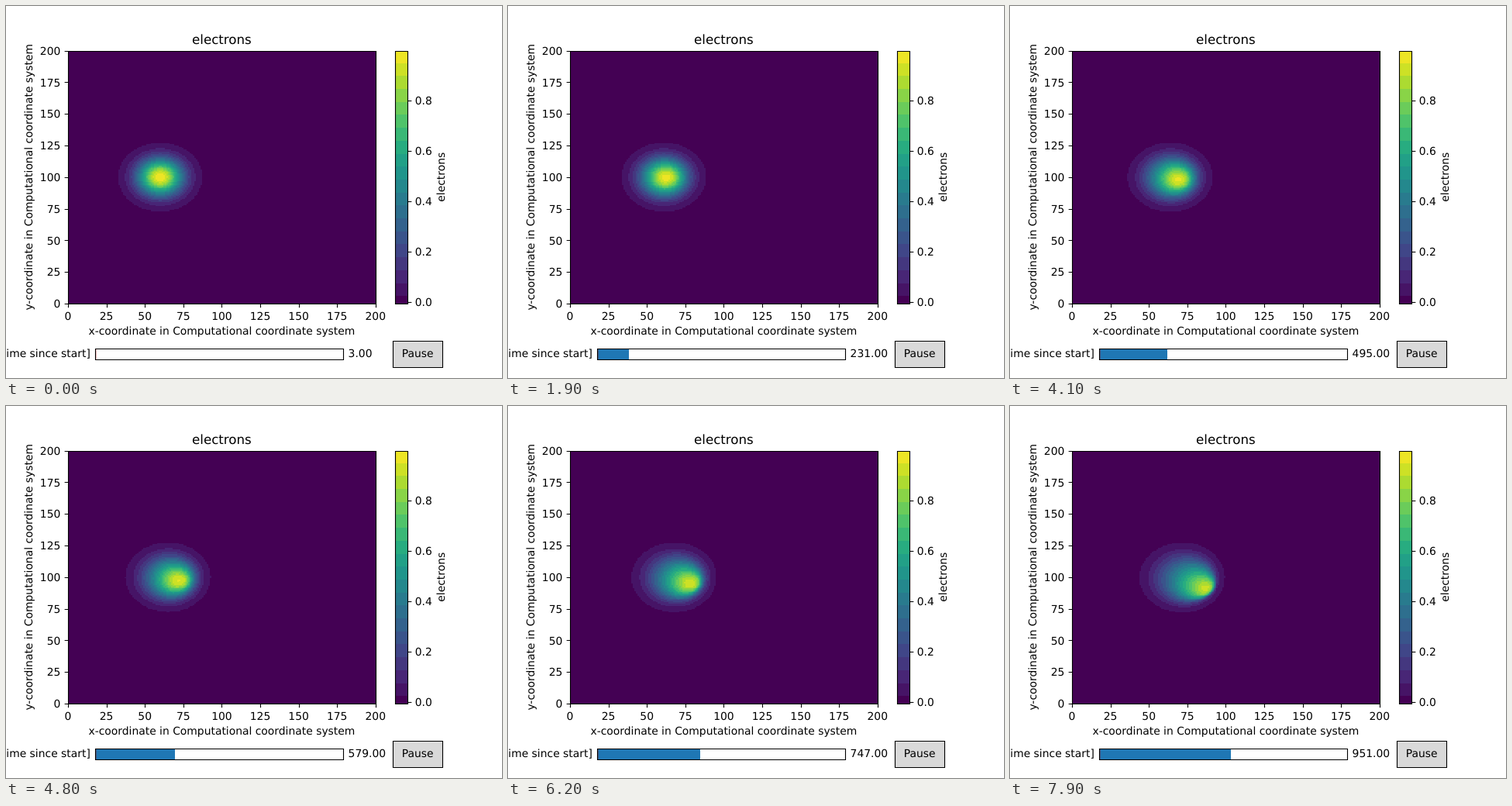
Recreate the animation shown at these times as an HTML page with a canvas. Size 640x480 px, loop 8 s.

```html
<!DOCTYPE html>
<html lang="en">
<head>
<meta charset="utf-8">
<title>electrons</title>
<style>
  html, body { margin: 0; width: 100%; height: 100%; overflow: hidden; background: #fff; }
  canvas { position: absolute; left: 80px; top: 58px; }
  svg { position: absolute; left: 0; top: 0; }
  text { font: 13.89px "DejaVu Sans", sans-serif; text-rendering: geometricPrecision; }
  .title { font-size: 16.67px; }
  .mid { text-anchor: middle; }
  .end { text-anchor: end; }
  .line { fill: none; stroke: #000; stroke-width: 1.11; }
</style>
</head>
<body>
<canvas id="map" width="397" height="326"></canvas>
<svg id="stage" width="640" height="480" viewBox="0 0 640 480"></svg>
<script>
const STEPS = 80, STEP_MS = 100;
const stage = document.getElementById('stage');

function add(tag, attrs, text) {
  const node = document.createElementNS('http://www.w3.org/2000/svg', tag);
  for (const key in attrs) node.setAttribute(key, attrs[key]);
  if (text !== undefined) node.textContent = text;
  stage.appendChild(node);
  return node;
}
const label = (x, y, text, cls = '', turn) =>
  add('text', turn ? { class: cls, transform: `translate(${x} ${y}) rotate(-90)` } : { x, y, class: cls }, text);
const box = (x, y, width, height, fill) => add('rect', { x, y, width, height, fill });
const line = d => add('path', { d, class: 'line' });
const snap = v => Math.floor(v + 0.5) + 0.5;

// Colour scale: viridis in flat bands
const viridis = ['440154', '482475', '414487', '355f8d', '2a788e', '21918c',
  '22a884', '44bf70', '7ad151', 'bddf26', 'fde725']
  .map(hex => [0, 2, 4].map(i => parseInt(hex.substr(i, 2), 16)));
const LOW = -0.005, HIGH = 0.9975, FIRST = 0.025, BAND = 0.0513, BANDS = 20;

function colour(value) {
  const p = Math.min(0.9999, Math.max(0, (value - LOW) / (HIGH - LOW))) * 10;
  const i = Math.floor(p);
  return viridis[i].map((c, k) => Math.round(c + (viridis[i + 1][k] - c) * (p - i)));
}
const bandStart = k => k ? FIRST + (k - 1) * BAND : LOW;
const bandEnd = k => Math.min(HIGH, bandStart(k + 1) || FIRST);
const bandColours = Array.from({ length: BANDS }, (_, k) =>
  k ? colour((bandStart(k) + bandEnd(k)) / 2) : viridis[0]);
const bandOf = v => v < FIRST ? 0 : Math.min(BANDS - 1, 1 + Math.floor((v - FIRST) / BAND));

// Density: a Gaussian cloud carried by a drift that grows with density
const W = 100, H = 84, X0 = 20, Y0 = 58;

function minmod(a, b) {
  return a * b <= 0 ? 0 : Math.abs(a) < Math.abs(b) ? a : b;
}
function change(u, drift, steepen, sink, spread) {
  const du = new Float64Array(u.length);
  for (let j = 2; j < H - 2; j++) {
    for (let i = 2; i < W - 2; i++) {
      const n = j * W + i, c = u[n];
      const l = u[n - 1], r = u[n + 1], b = u[n - W], t = u[n + W];
      const right = c + minmod(c - l, r - c) / 2;
      const below = c - minmod(c - b, t - c) / 2;
      const fx = drift * right + steepen * right * right / 2;
      const fy = sink * below * below / 2;
      du[n] += spread * (l + r + b + t - 4 * c) - fx - fy;
      du[n + 1] += fx;
      du[n - W] += fy;
    }
  }
  return du;
}
function advance(u, from, to) {
  const along = to ** 1.7 - from ** 1.7;
  const down = to ** 2.5 - from ** 2.5;
  const rates = [11.2 * along, 18.5 * along, 10.3 * down, 2.5 * (to - from)];
  const first = change(u, ...rates);
  const second = change(u.map((v, n) => v + first[n]), ...rates);
  return u.map((v, n) => v + (first[n] + second[n]) / 2);
}

const fields = [Float64Array.from({ length: W * H }, (_, n) => {
  const dx = X0 + n % W + 0.5 - 60, dy = Y0 + Math.floor(n / W) + 0.5 - 100;
  return Math.exp(-(dx * dx + dy * dy) / 200);
})];
const last = STEPS - 1;
for (let k = 1; k < STEPS; k++) {
  const half = advance(fields[k - 1], (k - 1) / last, (k - 0.5) / last);
  fields.push(advance(half, (k - 0.5) / last, k / last));
}

const map = document.getElementById('map').getContext('2d');
const image = map.createImageData(397, 326);

function drawField(u) {
  for (let py = 0, p = 0; py < 326; py++) {
    const j = Math.floor((325.5 - py) / 1.632) - Y0;
    for (let px = 0; px < 397; px++, p += 4) {
      const i = Math.floor((px + 0.5) / 1.984) - X0;
      const inside = i >= 0 && i < W && j >= 0 && j < H;
      const rgb = bandColours[inside ? bandOf(u[j * W + i]) : 0];
      image.data[p] = rgb[0];
      image.data[p + 1] = rgb[1];
      image.data[p + 2] = rgb[2];
      image.data[p + 3] = 255;
    }
  }
  map.putImageData(image, 0, 0);
}

// Main axes
line('M80.5 58.5H477.5V384.5H80.5Z');
for (let v = 0; v <= 200; v += 25) {
  const x = 80 + v * 1.984, y = 384 - v * 1.632;
  line(`M${snap(x)} 384.5v4.86M80.5 ${snap(y)}h-4.86`);
  label(x, 405, v, 'mid');
  label(70.3, y + 5.1, v, 'end');
}
label(278.4, 49.2, 'electrons', 'mid title');
label(278.4, 424, 'x-coordinate in Computational coordinate system', 'mid');
label(34.3, 220.8, 'y-coordinate in Computational coordinate system', 'mid', true);

// Colour bar
const barY = v => 384 - (v - LOW) / (HIGH - LOW) * 326.4;
for (let k = 0; k < BANDS; k++) {
  const top = Math.round(barY(bandEnd(k))), bottom = Math.round(barY(bandStart(k)));
  box(502, top, 16, bottom - top, `rgb(${bandColours[k]})`);
}
line('M502.5 58.5H518.5V384.5H502.5Z');
for (const v of [0, 0.2, 0.4, 0.6, 0.8]) {
  line(`M518.5 ${snap(barY(v))}h4.86`);
  label(527.8, barY(v) + 5.1, v.toFixed(1));
}
label(566, 220.8, 'electrons', 'mid', true);

// Slider and button
const fill = box(115, 442, 0, 14, '#1f77b4');
box(115, 442, 1.2, 14, '#f00');
line('M115.5 442.5H435.5V456.5H115.5Z');
label(108.8, 453, '[time since start]', 'end');
const readout = label(441.6, 453, '');
box(499, 432, 64, 34, '#d9d9d9');
line('M499.5 432.5H563.5V466.5H499.5Z');
label(531.2, 453, 'Pause', 'mid');

let shown = -1;
function draw(ms) {
  const k = Math.floor(ms / STEP_MS) % STEPS;
  if (k === shown) return;
  shown = k;
  drawField(fields[k]);
  fill.setAttribute('width', Math.round(115.2 + 320 * k / 149) - 115);
  readout.textContent = (3 + 12 * k).toFixed(2);
}

const start = performance.now();
function tick() {
  draw(performance.now() - start);
  requestAnimationFrame(tick);
}
tick();
</script>
</body>
</html>
```
